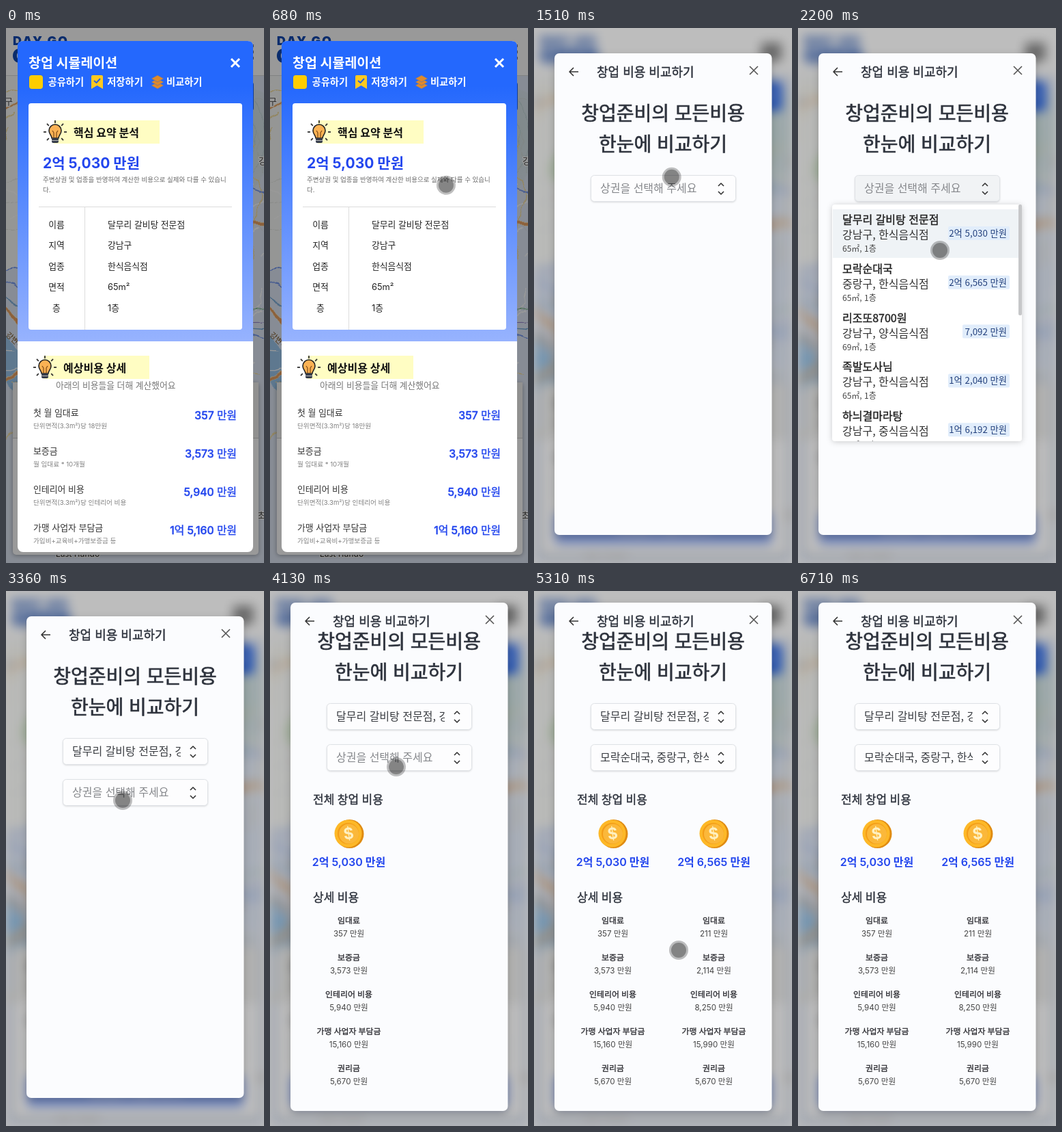
An HTML page that plays this animation: 378x782 px, repeating every 7.37 s.

```html
<!DOCTYPE html>
<html lang="ko">
<head>
<meta charset="utf-8">
<style>
  html, body { margin: 0; width: 100%; height: 100%; overflow: hidden; background: #fff; }
  svg.layer { position: absolute; left: 0; top: 0; width: 378px; height: 782px;
    font-family: 'Noto Sans CJK KR', 'Noto Sans CJK', sans-serif; }
  .ui { font-family: Inter, 'Noto Sans CJK KR', 'Noto Sans CJK', sans-serif; }
</style>
</head>
<body>
<svg class="layer" id="page" viewBox="0 0 378 782"></svg>
<svg class="layer" id="overlay" viewBox="0 0 378 782"></svg>
<script>
const LOOP = 7370;
const BLUE = '#2346ee', INK = '#2e333d';
const $ = id => document.getElementById(id);

// ---------- markup helpers ----------
// Medium weight gets a hairline outline, since Hangul may only come in regular and bold.
const text = (x, y, size, str, fill = '#222', weight = 400, anchor = 'start', extra = '') => {
  const medium = weight === 500 ? `stroke="${fill}" stroke-width="${size * .025}"` : '';
  return `<text x="${x}" y="${y}" font-size="${size}" fill="${fill}" font-weight="${weight}" text-anchor="${anchor}" ${medium} ${extra}>${str}</text>`;
};
const mid = (x, y, size, str, fill, weight, extra) => text(x, y, size, str, fill, weight, 'middle', extra);
const rect = (x, y, w, h, fill, r = 0, extra = '') =>
  `<rect x="${x}" y="${y}" width="${w}" height="${h}" fill="${fill}" rx="${r}" ${extra}/>`;
const circle = (x, y, r, fill, extra = '') => `<circle cx="${x}" cy="${y}" r="${r}" fill="${fill}" ${extra}/>`;
const stroke = (d, color, width = 1, extra = '') =>
  `<path d="${d}" fill="none" stroke="${color}" stroke-width="${width}" stroke-linejoin="round" ${extra}/>`;
const group = (attrs, ...parts) => `<g ${attrs}>${parts.join('')}</g>`;
const at = (x, y, ...parts) => group(`transform="translate(${x} ${y})"`, ...parts);
const repeat = (n, make) => Array.from({ length: n }, (_, i) => make(i)).join('');

// ---------- map ----------
let seed = 11;
const random = () => (seed = seed * 16807 % 2147483647) / 2147483647;

function wander(steps, stride) {
  let angle = random() * 6.3;
  return `M${random() * 378} ${70 + random() * 500}` + repeat(steps, () => {
    angle += random() - .5;
    return `l${stride * Math.cos(angle)} ${stride * Math.sin(angle)}`;
  });
}
const streets = (count, steps, stride, color, width) => stroke(repeat(count, () => wander(steps, stride)), color, width);
const border = d => stroke(d, '#7699ef', 1.8);
const highway = (d, width = 2) => stroke(d, '#fbe3b8', width + 1.5) + stroke(d, '#e8a263', width);
const hill = (x, y, r) =>
  circle(x, y, r, 'url(#green)') + repeat(6, i => circle(x, y, r * (i + 1) / 7, 'none', 'stroke="#a9c7c4" stroke-width=".5"'));

const westBorder = 'M0 355 42 345 55 310 68 265 75 215 100 160 118 130 190 98 203 125 225 135 232 185 198 215 210 275 165 320 95 370';
const terrain = group('filter="url(#wobble)"',
  `<path d="${westBorder.split(' 203 ')[0]} 205 50H-9V355z" fill="#f8f9f7"/>`,
  hill(290, 160, 105), hill(225, 365, 55), hill(140, 158, 28), circle(48, 202, 23, '#d3e8c8'),
  stroke('M-20 465L120 605', '#9cc8ee', 48),
  streets(130, 4, 9, '#fff', 1.4), streets(60, 6, 10, '#d3d8d2', .6), streets(26, 9, 16, '#f3dd9c', 1.5),
  highway('M0 118Q60 80 108 130T112 250T62 428'),
  highway('M195 125Q130 150 112 230T95 400', 1.5),
  highway('M160 345Q185 385 235 425T275 530'),
  highway('M-5 520Q90 440 180 375T290 297T385 287', 4),
  highway('M-5 405Q40 445 110 540', 4),
  stroke('M0 395Q100 440 200 435T378 440', '#74a9d8', 1.5),
  stroke('M250 520Q262 430 378 428', '#8b79c6', 1.2),
  stroke('M290 520Q300 420 378 412', '#7bb58a', 1.2),
  border(westBorder),
  border('M232 185 265 170 298 185 300 125 290 70M298 185 310 220 385 243'),
  border('M210 275 232 350 235 410 385 455M-5 372 92 402 180 475 240 520'));

const label = (x, y, str, size = 12, fill = '#444') =>
  mid(x, y, size, str, fill, 400, 'stroke="#fff" stroke-width="2.5" paint-order="stroke"');
const pinKinds = {
  tree: ['#5f9e70', '<path d="M0-5l4 6h-3v4h-2v-4h-3z" fill="#fff"/>'],
  palace: ['#a8775c', stroke('M-4-2h8m-7 2v4m3-4v4m3-4v4M-4 4h8', '#fff', 1.3)],
  train: ['#7ba0d3', rect(-3.5, -4, 7, 6, '#fff', 1.5) + stroke('M-3 4h6', '#fff', 1.2)]
};
const pin = (kind, x, y, name) =>
  at(x, y, circle(0, 0, 8, pinKinds[kind][0], 'stroke="#fff"'), pinKinds[kind][1], label(0, 19.5, name, 11.5));
const places = [
  ['tree', 290, 308, '북악팔각정'], ['tree', 223, 370, '인왕산'], ['tree', 53, 491, '망원한강공원'],
  ['palace', 279, 396, '경복궁'], ['palace', 320, 388, '창덕궁'],
  ['train', 40, 385, '수색역'], ['train', 97, 429, '가좌역'], ['train', 260, 481, '서울역']];
const districts = [
  [133, 248, '은평구'], [168, 400, '서대문구'], [77, 469, '마포구'], [300, 389, '종로'], [335, 465, '중구'],
  [322, 74, '북한산'], [4, 112, '구'], [376, 199, '강'], [374, 717, '초']];

// ---------- page ----------
const chevron = (x, color) => stroke(`M${x - 6} 666l6 6 6-6`, color, 1.8);
const field = (x, w, str, color, line, arrow) =>
  rect(x + .5, 650, w, 38, '#fff', 6, `stroke="${line}"`) + chevron(x + w - 17, arrow) +
  `<svg x="${x + 13}" y="650" width="${w - 48}" height="38">${text(0, 23, 14, str, color)}</svg>`;

$('page').innerHTML = `<defs>
  <radialGradient id="green"><stop offset=".5" stop-color="#cfe2df"/><stop offset="1" stop-color="#dce7f0"/></radialGradient>
  <filter id="wobble" x="-5%" y="-5%" width="110%" height="110%" color-interpolation-filters="sRGB">
    <feTurbulence type="fractalNoise" baseFrequency=".045" numOctaves="2" seed="4"/>
    <feDisplacementMap in="SourceGraphic" scale="14" xChannelSelector="R" yChannelSelector="G"/>
  </filter></defs>` +
  rect(0, 0, 378, 782, '#e1e9f7') + terrain +
  rect(101, 91, 23, 14, '#fff7e6', 2, 'stroke="#a98b62"') + mid(112.5, 102, 10, '371', '#76552d') +
  rect(49, 445, 21, 15, '#3d73c9', 7) + mid(59.5, 457, 11, '48', '#fff', 700) +
  mid(0, 0, 11, '강변북로', '#7a5420', 400, 'transform="translate(14 463) rotate(42)"') +
  mid(0, 0, 10, '내부순환로', '#a8601e', 700, 'transform="translate(168 368) rotate(-68)"') +
  districts.map(d => label(...d, 13)).join('') + places.map(p => pin(...p)).join('') +
  circle(284, 437, 5, '#fff', 'stroke="#222" stroke-width="1.5"') + circle(284, 437, 2.2, '#222') +
  label(284, 456, '서울특별시청', 14.5, '#222') + label(105, 773, 'East Hando', 12, '#222') +
  rect(0, 0, 378, 69, '#fff') + rect(0, 69, 378, 1, '#d6d8da') +
  group('class="ui"',
    text(10, 25, 18, 'DAY GO', '#1149b4', 900, 'start', 'letter-spacing="2"'),
    text(9, 51, 29, 'OPEN', '#1149b4', 900, 'start', 'letter-spacing="1"'),
    stroke('M333 26h29.500m-29.500 9h29.500m-29.500 9h29.500', '#000', 4),
    rect(235, 79, 128, 42, '#2465ef', 4), mid(299.5, 105, 16, '창업 시뮬레이션', '#fff', 700),
    rect(10, 518, 360, 252, '#fff', 5, 'style="filter:drop-shadow(0 1px 3px #0005)"'),
    rect(10, 518, 360, 81, '#f1f1ef'), rect(10, 599, 360, 1, '#cdcdcd'),
    text(31, 555, 21, '상권분석', '#222', 500),
    text(31, 582, 14.4, '상권별 단위의 다양한 정보를 조회할 수 있습니다.', '#444'),
    text(31, 633, 14.3, '분석하고 싶은 상권을 선택해주세요.'),
    field(31, 79, '자치구', '#777', '#cbd3dc', '#222'),
    field(115, 85, '행정동', '#aab0b4', '#e2e7ec', '#a8adb2'),
    field(205, 143, '상권', '#aab0b4', '#e2e7ec', '#a8adb2'),
    rect(31, 709, 317, 45, '#94b1fc', 5), mid(189.5, 738, 17.5, '상권분석 결과 보기', '#fff', 700));

// ---------- simulation dialog ----------
const bulb = (x, y) => at(x, y,
  repeat(7, i => stroke('M0-13v-4', '#333', 1.8, `transform="rotate(${i * 45 - 135})"`)),
  '<path d="M-5 9C-5 5-9 3-9-2A9 9 0 0 1 9-2C9 3 5 5 5 9z" fill="#fbb254" stroke="#222" stroke-width="1.6"/>',
  stroke('M-2 8v-7l-2-3m6 10v-7l2-3', '#7b4a17', 1.2),
  rect(-5, 9, 10, 7, '#343b4a', 2), stroke('M-5 12.500h10', '#bbb'));
const heading = (x, y, str) => at(x, y, rect(15, -17, 155, 34, '#fffdc3'), bulb(17, 0), text(44, 6.5, 16, str, '#111', 700));

const summary = [['이름', '달무리 갈비탕 전문점'], ['지역', '강남구'], ['업종', '한식음식점'], ['면적', '65m²'], ['층', '1층']];
const costs = [
  ['첫 월 임대료', '단위면적(3.3m²)당 18만원', '357 만원'],
  ['보증금', '월 임대료 * 10개월', '3,573 만원'],
  ['인테리어 비용', '단위면적(3.3m²)당 인테리어 비용', '5,940 만원'],
  ['가맹 사업자 부담금', '가입비+교육비+가맹보증금 등', '1억 5,160 만원']];

const simulation = group('id="simulation" class="ui"',
  rect(17, 19, 345, 747, '#fff', 8),
  '<path d="M17 458V27q0-8 8-8h329q8 0 8 8v431z" fill="url(#sky)"/>',
  text(33, 58, 19.5, '창업 시뮬레이션', '#fff', 700),
  stroke('M330 45l12 12m0-12l-12 12', '#fff', 3),
  rect(34, 69, 20, 20, '#ffcd00', 4),
  '<path d="M125 71q0-2 2-2h13q2 0 2 2v18l-8.500-5-8.500 5z" fill="#ffc91f"/>',
  stroke('M129 77l3.500 3 5.500-6', '#2b62d8', 2),
  repeat(3, i => `<path d="M213 ${84 - i * 5}l9-5 9 5-9 5z" fill="#e08a2c" stroke="#4a6fc0" stroke-width=".6"/>`),
  ...['공유하기', '저장하기', '비교하기'].map((str, i) => text(61.5 + i * 86.7, 84, 14.3, str, '#fff', 700)),
  rect(33, 110, 313, 331, '#fff', 4),
  heading(55, 152, '핵심 요약 분석'),
  text(54, 205, 21, '2억 5,030 만원', BLUE, 700),
  text(54, 225, 9.5, '주변상권 및 업종을 반영하여 계산한 비용으로 실제와 다를 수 있습니', '#6a6a6a'),
  text(54, 240, 9.5, '다.', '#6a6a6a'),
  rect(48, 261, 283, 1, '#dcdcdc'), rect(115, 261, 1, 180, '#dcdcdc'),
  ...summary.map(([name, value], i) => at(0, 291.5 + i * 30.6, mid(74, 0, 12.8, name), text(149, 0, 12.8, value))),
  heading(40, 496, '예상비용 상세'),
  text(73, 526.5, 12.8, '아래의 비용들을 더해 계산했어요', '#777'),
  ...costs.map(([name, note, value], i) => at(0, 567 + i * 56,
    text(40, 0, 12.9, name, '#333'), text(40, 18, 9.6, note, '#808080'),
    text(338, 5, 15.8, value, BLUE, 500, 'end'))));

// ---------- comparison dialog ----------
const ROW = 71.8;
const shops = [
  ['달무리 갈비탕 전문점', '강남구, 한식음식점', '65㎡, 1층', '2억 5,030 만원'],
  ['모락순대국', '중랑구, 한식음식점', '65㎡, 1층', '2억 6,565 만원'],
  ['리조또8700원', '강남구, 양식음식점', '69㎡, 1층', '7,092 만원'],
  ['족발도사님', '강남구, 한식음식점', '65㎡, 1층', '1억 2,040 만원'],
  ['하늬결마라탕', '강남구, 중식음식점', '65㎡, 1층', '1억 6,192 만원']];

function shopRow([name, place, size, price], i) {
  const badge = 7 * price.length + 13;
  return at(0, i * ROW,
    text(65, 286, 16, name, '#222', 500), text(65, 308, 16, place, '#333'), text(65, 327, 12, size, '#444'),
    rect(310 - badge, 290, badge, 20, '#e1edfb', 2), text(306, 305, 13.3, price, '#23407c', 400, 'end'));
}
const shopList = (id, dy, active) => group(`id="${id}" transform="translate(0 ${dy})"`,
  rect(50, 258, 278, 346, '#fff', 4, 'style="filter:drop-shadow(0 1px 4px #0003)"'),
  group('clip-path="url(#listClip)"', rect(51, 265 + active * ROW, 272, 71, '#eff3f6'), ...shops.map(shopRow)),
  rect(323, 258, 5, 162, '#c6c7c9', 2));

const select = (id, y) => group(`id="${id}"`,
  rect(83.5, y + .5, 212, 38, '#fdfdfe', 5, 'stroke="#dfe2e6" style="filter:drop-shadow(0 1px 1px #0002)"'),
  `<svg x="97" y="${y}" width="159" height="38">${text(0, 25, 16, '')}</svg>`,
  stroke(`M270 ${y + 16}l4-4 4 4m-8 8l4 4 4-4`, '#333', 1.6));

const coin = (x, y) => at(x, y,
  circle(1, .5, 21, '#e08c12'), circle(-1, 0, 20, '#fdb827'), circle(-1, 0, 15.5, '#f39c17'),
  circle(0, .5, 14.5, '#fbb83a'), mid(-.5, 8, 23, '$', '#fff0c0', 700, 'transform="rotate(-8)"'));

const detailNames = ['임대료', '보증금', '인테리어 비용', '가맹 사업자 부담금', '권리금'];
const column = (id, x, total, values) => group(`id="${id}"`,
  coin(x, 405.5), mid(x, 453, 16, total, BLUE, 600),
  ...values.map((value, i) => at(x, 536.5 + i * 54,
    mid(0, 0, 11.9, detailNames[i], '#2b2b30', 500), mid(0, 19, 11.6, value + ' 만원', '#444'))));

const comparison = group('id="comparison"',
  rect(30, 37, 318.5, 704, '#fbfcfe', 7, 'id="sheet" style="filter:drop-shadow(0 4px 6px #0003)"'),
  stroke('M65 64h-13m6-6l-6 6 6 6', '#333', 1.6),
  text(92, 70.5, 18, '창업 비용 비교하기', INK, 500),
  stroke('M316 56l12 12m0-12l-12 12', '#555', 1.6),
  group('clip-path="url(#bodyClip)"', group('id="body"',
    mid(189, 134.5, 28, '창업준비의 모든비용', INK, 500),
    mid(189, 179.5, 28, '한눈에 비교하기', INK, 500),
    select('select1', 215), select('select2', 275),
    group('id="details" class="ui"',
      text(63, 361.5, 17, '전체 창업 비용', INK, 500), text(63, 504.5, 17, '상세 비용', INK, 500),
      column('column1', 115.5, '2억 5,030 만원', ['357', '3,573', '5,940', '15,160', '5,670']),
      column('column2', 263.5, '2억 6,565 만원', ['211', '2,114', '8,250', '15,990', '5,670'])),
    shopList('list1', 0, 0), shopList('list2', 60, 1))));

$('overlay').innerHTML = `<defs>
  <linearGradient id="sky" x2="0" y2="1"><stop offset=".15" stop-color="#2468fd"/><stop offset="1" stop-color="#97b3fe"/></linearGradient>
  <clipPath id="listClip">${rect(50, 258, 278, 346, '#000', 4)}</clipPath>
  <clipPath id="bodyClip">${rect(30, 78, 318, 700, '#000')}</clipPath></defs>` +
  rect(0, 0, 378, 782, '#000', 0, 'id="shade"') + simulation + comparison +
  group('id="cursor"', circle(0, 0, 14, '#000', 'id="halo"'), circle(0, 0, 11, '#000', 'opacity=".3"'));

// ---------- motion ----------
const ramp = (t, a, b) => Math.min(1, Math.max(0, (t - a) / (b - a)));
const ease = p => p * p * (3 - 2 * p);
const pulse = (t, opens, closes) => ramp(t, opens, opens + 130) * (1 - ramp(t, closes, closes + 130));
const show = (id, opacity) => {
  $(id).style.display = opacity > 0 ? '' : 'none';
  $(id).style.opacity = opacity;
};
const move = (id, x, y) => $(id).setAttribute('transform', `translate(${x} ${y})`);

// Each move: departure, arrival, destination. The cursor rests and presses after arriving.
const moves = [
  [260, 850, 245, 88], [1080, 1640, 195, 238], [1850, 2060, 208, 325], [2270, 2480, 178, 549],
  [2480, 3160, 171, 306], [3430, 3980, 185, 257], [4200, 4600, 190, 378], [4900, 5180, 212, 525], [6230, 6710, 336, 800]];

function placeCursor(t) {
  let x = 310, y = 800, pressed = false;
  for (const [start, end, toX, toY] of moves) {
    const p = ease(ramp(t, start, end));
    x += (toX - x) * p;
    y += (toY - y) * p;
    pressed ||= t >= end && t < end + 120;
  }
  move('cursor', x, y);
  $('halo').setAttribute('opacity', pressed ? .45 : .25);
}

function setSelect(id, value, open) {
  const label = $(id).querySelector('text');
  label.textContent = value || '상권을 선택해 주세요';
  label.setAttribute('fill', value ? '#3a3d42' : '#85878b');
  $(id).querySelector('rect').setAttribute('fill', open ? '#f1f3f5' : '#fdfdfe');
}

function render(t) {
  const simulated = 1 - ramp(t, 850, 940);
  const compared = ease(ramp(t, 1030, 1350));
  const firstChosen = t >= 2340, secondChosen = t >= 4950, grown = t >= 3430 ? 1 : 0;
  const list1 = pulse(t, 1850, 2300), list2 = pulse(t, 4200, 4890);

  $('page').style.filter = compared ? `blur(${8 * compared}px)` : 'none';
  $('shade').style.opacity = .4 * simulated + .26 * compared;
  show('simulation', simulated);
  show('comparison', compared);
  move('comparison', 0, 20 * (1 - compared) - 20 * grown);
  $('sheet').setAttribute('height', 704 + 39 * grown);
  move('body', 0, -31 * ease(ramp(t, 3570, 3960)));

  setSelect('select1', firstChosen && '달무리 갈비탕 전문점, 강남구', list1 > 0);
  setSelect('select2', secondChosen && '모락순대국, 중랑구, 한식음식점', list2 > 0);
  show('select2', +firstChosen);
  show('details', grown);
  show('column2', +secondChosen);
  show('list1', list1);
  show('list2', list2);
  placeCursor(t);
}

function tick() {
  render(performance.now() % LOOP);
  requestAnimationFrame(tick);
}
tick();
</script>
</body>
</html>
```
